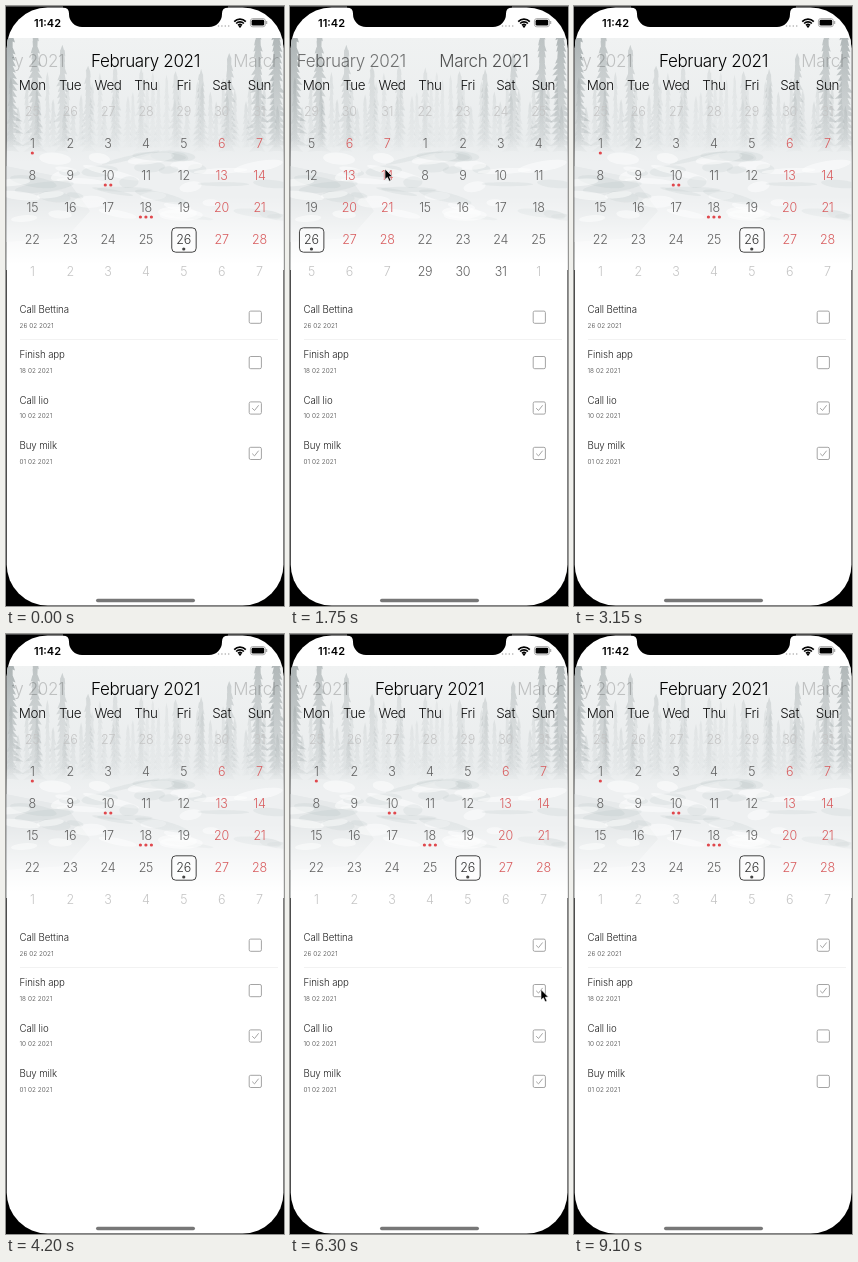
Animation, 278 px wide and 600 px high, one loop 9.17 s. Source, as an HTML page with a canvas:

```html
<!DOCTYPE html>
<html lang="en">
<head>
<meta charset="utf-8">
<title>Calendar and tasks</title>
<style>
  html, body { margin: 0; width: 100%; height: 100%; overflow: hidden; background: #000; }
  canvas { display: block; width: 278px; height: 600px; }
</style>
</head>
<body>
<canvas id="stage"></canvas>
<script>
const W = 278, H = 600, LOOP = 9170;
const PAGE = 265, COL = PAGE / 7, LEFT = 7.4, MID = LEFT + PAGE / 2;
const ROW = 32, TASK_ROW = 45.4, TASK_TOP = 303.3;
const FONT = 'Inter, Roboto, sans-serif';
const canvas = document.getElementById('stage');
const ctx = canvas.getContext('2d');
const dpr = window.devicePixelRatio || 1;
canvas.width = W * dpr;
canvas.height = H * dpr;

const DAYS = ['Mon', 'Tue', 'Wed', 'Thu', 'Fri', 'Sat', 'Sun'];
const EVENTS = { '1-1': 1, '1-10': 2, '1-18': 3, '1-26': 1 };
const SELECTED = '1-26', TODAY = '3-2';

const TASKS = [
  { name: 'Call Bettina', date: '26 02 2021', done: false, tap: 5180 },
  { name: 'Finish app', date: '18 02 2021', done: false, tap: 5950 },
  { name: 'Call lio', date: '10 02 2021', done: true, tap: 6930 },
  { name: 'Buy milk', date: '01 02 2021', done: true, tap: 7910 }
];
const TAP_LENGTH = 140;

const DRAGS = [
  { press: 1400, lift: 1680, from: { x: 132, y: 171 }, to: { x: 95, y: 163 }, page: -1 },
  { press: 2310, lift: 2660, from: { x: 95, y: 163 }, to: { x: 127, y: 163 }, page: 0 }
];
const HOLD = 70, GLIDE = 420;

const clamp = p => Math.max(0, Math.min(1, p));
const lerp = (a, b, p) => a + (b - a) * p;
const progress = (t, a, b) => clamp((t - a) / (b - a));
const easeIn = p => p ** 3;
const easeOut = p => 1 - (1 - p) ** 4;
const mix = (a, b, p) => ({ x: lerp(a.x, b.x, p), y: lerp(a.y, b.y, p) });

function text(str, x, y, size, color, { weight = 300, track = 0, align = 'center' } = {}) {
  ctx.font = `${weight} ${size}px ${FONT}`;
  ctx.letterSpacing = `${track}px`;
  ctx.textAlign = align;
  ctx.fillStyle = color;
  ctx.fillText(str, x, y + size * 0.364);
}

function box(x, y, w, h, r) {
  ctx.beginPath();
  ctx.roundRect(x, y, w, h, r);
}

function fill(color) {
  ctx.fillStyle = color;
  ctx.fill();
}

function stroke(color, width = 1) {
  ctx.strokeStyle = color;
  ctx.lineWidth = width;
  ctx.stroke();
}

function disc(x, y, r, color) {
  ctx.beginPath();
  ctx.arc(x, y, r, 0, 7);
  fill(color);
}

function poly(points, color) {
  ctx.beginPath();
  points.forEach(([x, y]) => ctx.lineTo(x, y));
  ctx.closePath();
  fill(color);
}

function fade(y0, y1, from, to) {
  const g = ctx.createLinearGradient(0, y0, 0, y1);
  g.addColorStop(0, from);
  g.addColorStop(1, to);
  return g;
}

function random(seed) {
  return () => (seed = (seed * 16807) % 2147483647) / 2147483647;
}

// A ragged conifer, darkest at the top and lost in mist at its foot
function tree(x, top, base, half, alpha, rnd) {
  const right = [], left = [];
  const steps = Math.round((base - top) / 6);
  for (let i = 1; i <= steps; i++) {
    const p = i / steps, y = lerp(top, base, p);
    const reach = () => half * (0.2 + 0.8 * p) * (0.5 + 0.6 * rnd());
    right.push([x + reach(), y], [x + half * 0.2, y - 1]);
    left.unshift([x - half * 0.2, y - 1], [x - reach(), y]);
  }
  poly([[x, top], ...right, ...left],
    fade(Math.max(32, top), base, `rgba(95,108,110,${alpha})`, `rgba(95,108,110,${alpha * 0.2})`));
}

function scenery() {
  const rnd = random(41);
  const jitter = d => (rnd() - 0.5) * d;
  const side = x => clamp(Math.abs(x - MID) / MID);
  ctx.save();
  ctx.beginPath();
  ctx.rect(0, 32, W, 232);
  ctx.clip();
  ctx.fillStyle = fade(32, 140, '#f0f2f2', '#e9eced');
  ctx.fillRect(0, 32, W, 232);

  for (let x = 0; x < W; x += 7) {
    tree(x + jitter(6), 85 + jitter(40), 142, 6, 0.07 + 0.08 * side(x), rnd);
  }
  for (let i = 0; i <= 10; i++) {
    const x = i * 27.5 + jitter(10), edge = side(x) ** 2;
    tree(x, lerp(68, 5, edge) + jitter(16), 146, 9 + 6 * edge, 0.12 + 0.36 * edge, rnd);
  }

  ctx.fillStyle = fade(132, 156, 'rgba(238,241,241,0)', '#eef0f1');
  ctx.fillRect(0, 132, W, 132);
  poly([[0, 160], [60, 172], [84, 205], [60, 232], [0, 236]], '#e6e9ea');
  for (let i = 0; i < 46; i++) {
    ctx.beginPath();
    ctx.ellipse(rnd() * W, 146 + rnd() * 68, 8 + rnd() * 22, 2 + rnd() * 4, jitter(0.5), 0, 7);
    fill(i % 2 ? 'rgba(255,255,255,.5)' : 'rgba(150,162,166,.12)');
  }
  ctx.fillStyle = fade(190, 258, 'rgba(255,255,255,0)', '#fff');
  ctx.fillRect(0, 190, W, 74);
  ctx.restore();
}

function statusBar() {
  text('11:42', 41.5, 17.3, 11, '#000', { weight: 600 });
  for (let i = 0; i < 4; i++) disc(212.5 + i * 3.4, 20, 0.8, '#aaa');
  for (let r = 2.8; r < 9; r += 2.7) {
    ctx.beginPath();
    ctx.arc(234, 21.4, r, -Math.PI * 0.75, -Math.PI * 0.25);
    stroke('#000', 1.7);
  }
  disc(234, 20.4, 1.2, '#000');
  box(244.4, 12.6, 15, 8.2, 2.4);
  stroke('#999', 0.8);
  box(245.6, 13.8, 12.6, 5.8, 1.4);
  fill('#000');
  ctx.fillStyle = '#999';
  ctx.fillRect(260.2, 15, 1, 3);
}

function dayCell(date, month, x, y) {
  const key = `${date.getMonth()}-${date.getDate()}`;
  const selected = key === SELECTED;
  let color = '#c4c4c4';
  if (date.getMonth() === month) color = date.getDay() % 6 ? '#606060' : '#d85c5e';
  if (selected || key === TODAY) {
    box(x - 12, y - 12.2, 24.4, 24.4, 4);
    fill(selected ? 'rgba(255,255,255,.5)' : '#585858');
    if (selected) stroke('#444');
    color = selected ? '#333' : '#dedede';
  }
  text(date.getDate(), x, y - 0.3, 12.5, color, { track: -0.2 });
  const count = EVENTS[key] || 0;
  for (let i = 0; i < count; i++) {
    disc(x + (i - (count - 1) / 2) * 5.5, y + 9, 1.6, selected ? '#444' : '#e0484d');
  }
}

function monthPage(k, shift) {
  const first = new Date(2021, 1 + k, 1);
  const lead = (first.getDay() + 6) % 7 || 7;
  for (let i = 0; i < 42; i++) {
    const x = LEFT + (i % 7 + 0.5) * COL + shift;
    dayCell(new Date(2021, 1 + k, 1 - lead + i), first.getMonth(), x, 106 + Math.floor(i / 7) * ROW);
  }
}

function dragPoint(drag, t) {
  return mix(drag.from, drag.to, progress(t, drag.press + HOLD, drag.lift));
}

// Each drag follows the pointer, then glides to the page edge
function scrollAt(t) {
  return DRAGS.reduce((pos, drag) => {
    const dragged = pos + dragPoint(drag, t).x - drag.from.x;
    return lerp(dragged, drag.page * PAGE, easeOut(progress(t, drag.lift, drag.lift + GLIDE)));
  }, 0);
}

function calendar(t) {
  const scroll = scrollAt(t);
  ctx.save();
  ctx.beginPath();
  ctx.rect(6, 40, 266.5, 240);
  ctx.clip();
  for (let k = -2; k <= 3; k++) {
    const shift = k * PAGE + scroll;
    const title = new Date(2021, 1 + k, 1).toLocaleDateString('en-US', { month: 'long', year: 'numeric' });
    ctx.globalAlpha = 1 - 0.8 * clamp(Math.abs(shift) / PAGE);
    text(title, MID - 0.4 + shift / 2, 55, 17, '#000', { track: -0.35 });
    ctx.globalAlpha = 1;
    if (Math.abs(shift) < PAGE) monthPage(k, shift);
  }
  ctx.restore();
  DAYS.forEach((day, i) => text(day, LEFT + (i + 0.5) * COL, 79, 13.4, '#111', { track: -0.3 }));
}

function checkbox(y, done) {
  box(243.2, y - 6, 12.2, 12.2, 1.5);
  stroke('#a4a4a4');
  if (!done) return;
  ctx.beginPath();
  ctx.moveTo(246.2, y + 0.3);
  ctx.lineTo(248.5, y + 2.6);
  ctx.lineTo(252.6, y - 2.6);
  stroke('#a4a4a4');
}

function taskList(t) {
  ctx.fillStyle = '#f2f2f2';
  ctx.fillRect(14, 333, 258, 1);
  TASKS.forEach((task, i) => {
    const y = TASK_TOP + i * TASK_ROW;
    text(task.name, 13.5, y, 9.7, '#222', { align: 'left', track: -0.1 });
    text(task.date, 13.5, y + 16, 6.4, '#444', { align: 'left', track: 0.06 });
    checkbox(y + 7.8, task.done !== t >= task.tap + TAP_LENGTH + HOLD);
  });
}

const taskPoint = i => ({ x: 252.5 - 1.5 * i, y: 309 + 46 * i });

function pointerAt(t) {
  const [first, second] = DRAGS;
  if (t > first.press - 350 && t < second.lift + 280) {
    const entry = { x: 150, y: 262 }, exit = { x: 172, y: 170 };
    if (t < first.press) return mix(entry, first.from, progress(t, first.press - 350, first.press));
    if (t < second.press) return dragPoint(first, t);
    return mix(dragPoint(second, t), exit, progress(t, second.lift, second.lift + 280));
  }
  const start = TASKS[0].tap - 420, end = TASKS[3].tap + 700;
  if (t < start || t > end) return null;
  let at = mix({ x: 260, y: 420 }, taskPoint(0), easeOut(progress(t, start, start + 280)));
  for (let i = 1; i < TASKS.length; i++) {
    const leave = TASKS[i - 1].tap + TAP_LENGTH + HOLD;
    at = mix(at, taskPoint(i), easeIn(progress(t, leave, TASKS[i].tap - TAP_LENGTH)));
  }
  return mix(at, { x: 226, y: 575 }, progress(t, end - 280, end));
}

const isPressed = t =>
  DRAGS.some(d => t >= d.press && t < d.lift) ||
  TASKS.some(k => t >= k.tap && t < k.tap + TAP_LENGTH);

function pointer(t) {
  const at = pointerAt(t);
  if (!at) return;
  ctx.save();
  ctx.translate(at.x, at.y);
  if (isPressed(t)) {
    disc(0.3, 0.7, 14.8, 'rgba(255,255,255,.3)');
    stroke('#000', 2);
  }
  poly([[0, 0], [0, 10.5], [2.4, 8.3], [4.2, 12.2], [6, 11.4], [4.3, 7.7], [7.4, 7.5]], '#000');
  stroke('#fff', 0.6);
  ctx.restore();
}

function notch() {
  const top = 1.5, bottom = 21, left = 63, right = 216, r = 13, lip = 6;
  ctx.beginPath();
  ctx.moveTo(left - lip, 0);
  ctx.lineTo(left - lip, top);
  ctx.quadraticCurveTo(left, top, left, top + lip);
  ctx.arcTo(left, bottom, left + r, bottom, r);
  ctx.arcTo(right, bottom, right, bottom - r, r);
  ctx.lineTo(right, top + lip);
  ctx.quadraticCurveTo(right, top, right + lip, top);
  ctx.lineTo(right + lip, 0);
  fill('#000');
}

function draw(t) {
  ctx.setTransform(dpr, 0, 0, dpr, 0, 0);
  ctx.fillStyle = '#000';
  ctx.fillRect(0, 0, W, H);
  ctx.fillStyle = '#4a4a4a';
  ctx.fillRect(0, 0, W, 1);
  ctx.save();
  box(0.7, 1.5, 276.8, 598, 41);
  fill('#fff');
  ctx.clip();
  scenery();
  statusBar();
  calendar(t);
  taskList(t);
  box(90, 592.8, 99, 3.4, 1.7);
  fill('#777');
  ctx.restore();
  notch();
  pointer(t);
}

const start = performance.now();
function frame() {
  draw((performance.now() - start) % LOOP);
  requestAnimationFrame(frame);
}
frame();
</script>
</body>
</html>
```
